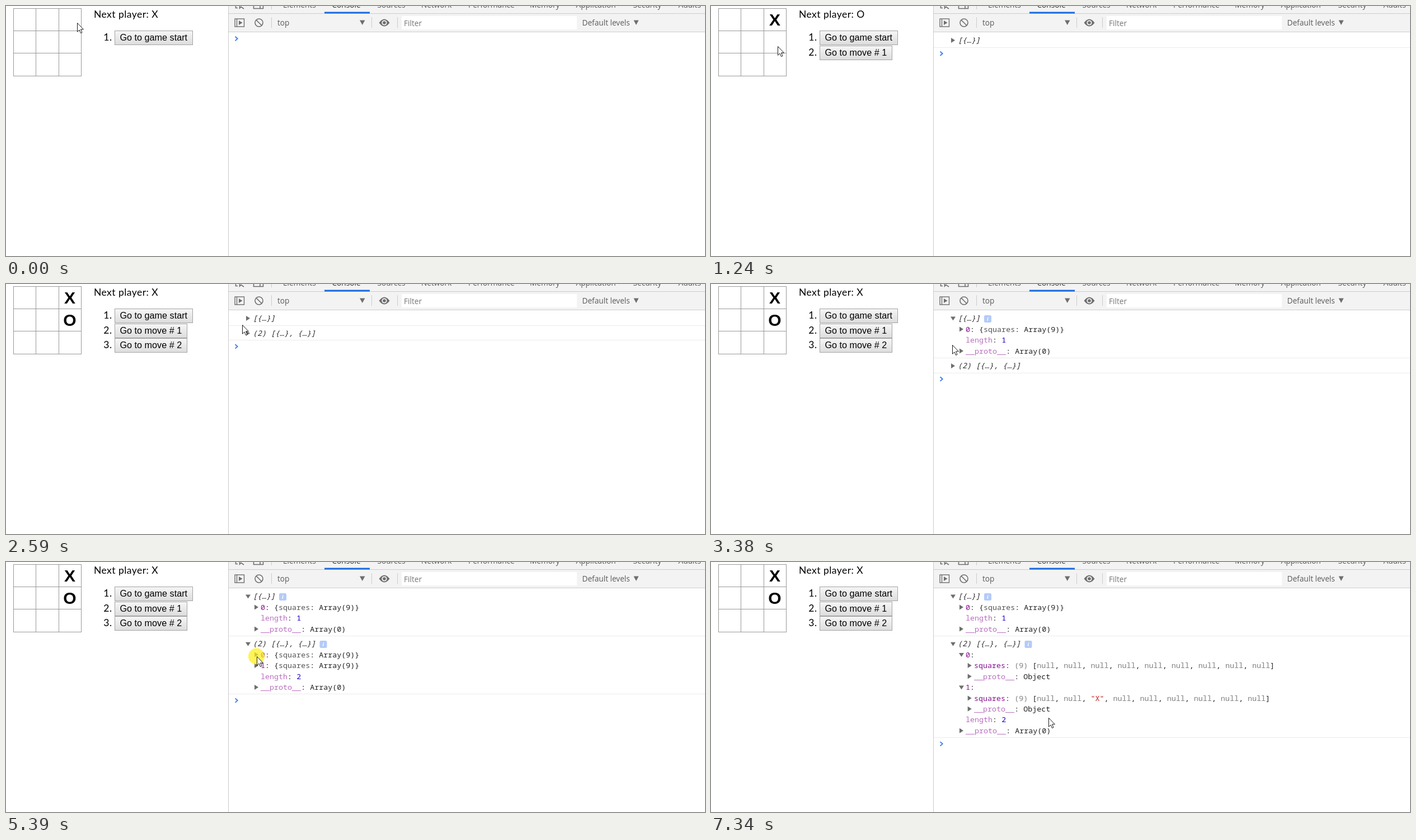
An HTML page for the animation above (7430 ms loop, 1249 px wide and 448 px high).

```html
<!DOCTYPE html>
<html lang="en">
<head>
<meta charset="utf-8">
<title>Game history in the console</title>
<style>
  html, body { margin: 0; width: 100%; height: 100%; overflow: hidden; background: #fff; }
  svg { display: block; width: 1249px; height: 448px; }
  text { white-space: pre; }
  .page { font: 17.5px Lato, sans-serif; letter-spacing: .45px; fill: #000; }
  .btn { font: 16.2px "Liberation Sans", Arial, sans-serif; fill: #000; }
  .mark { font: bold 30px "Liberation Sans", Arial, sans-serif; text-anchor: middle; }
  .ui { font: 13.65px "Open Sans", "Noto Sans", sans-serif; fill: #5a5a5a; }
  .mono { font: 13.36px "Noto Sans Mono", monospace; fill: #222; }
  .head { font-style: italic; fill: #303030; }
  .key { fill: #881391; }
  .dim { fill: #b96fc0; }
  .num { fill: #1c00cf; }
  .str { fill: #c41a16; }
  .gray { fill: #808080; }
  .name { fill: #565656; }
  .info { font: italic bold 10px "Liberation Serif", serif; fill: #fff; text-anchor: middle; }
  .tri { fill: #6e6e6e; }
  .icon { fill: none; stroke: #6e6e6e; stroke-width: 1.6; }
</style>
</head>
<body>
<svg viewBox="0 0 1249 448">
  <defs>
    <linearGradient id="face" x1="0" y1="0" x2="0" y2="1">
      <stop offset="0" stop-color="#f6f6f6"/><stop offset="1" stop-color="#dddddd"/>
    </linearGradient>
  </defs>

  <path d="M13.5 4V126M53.5 4V126M94.5 4V126M134.5 4V126M13 4.5H135M13 44.5H135M13 84.5H135M13 125.5H135"
        fill="none" stroke="#999"/>
  <g id="game"></g>

  <rect x="397" width="852" height="46" fill="#f3f3f3"/>
  <path d="M397.5 0V448M397 13.5H1249M397 46.5H1249" stroke="#ccc"/>
  <rect x="569" y="10.5" width="81" height="3" fill="#1a6be0"/>
  <g id="tabs" class="ui"></g>
  <path d="M474.5 0V6M474.5 20V39M653.5 20V39M699.5 20V39" stroke="#ccc"/>
  <g class="icon">
    <path d="M410.5 0V3.5H414M417.5 -4V4L420 1.5L425 5M442.5 0V4.5H459.5V0M454 0V4"/>
    <rect x="409" y="23" width="16.5" height="14" stroke-width="1.4"/>
    <path d="M412.5 23V37" stroke-width="1.4"/>
    <circle cx="452" cy="30" r="7"/><path d="M447 25L457 35"/>
  </g>
  <path class="tri" d="M416 26L422.5 30L416 34ZM632 25.5H641.5L636.7 34ZM1121.5 25.5H1130.5L1126 34Z"/>
  <path class="tri" d="M666.5 30Q676 17 685.5 30Q676 43 666.5 30Z"/>
  <circle cx="676" cy="30" r="4.6" fill="#f3f3f3"/><circle cx="676" cy="30" r="2.8" class="tri"/>
  <rect x="707" y="18" width="313" height="24" fill="#fff"/>
  <g class="ui">
    <text x="485" y="35">top</text>
    <text x="711" y="36" fill="#757575">Filter</text>
    <text x="1029.5" y="35">Default levels</text>
  </g>

  <g id="log"></g>
  <g id="pointer">
    <circle id="press" cx="-.5" cy="0" r="14.6" fill="#ffee14" fill-opacity=".7"/>
    <path d="M.5 .5V16.3L4 12.9L6.5 18.6L9 17.5L6.5 11.9H11.4Z" fill="#fff" stroke="#1a1a1a"/>
  </g>
</svg>

<script>
const LOOP = 7430;
const $ = id => document.getElementById(id);

const tabs = { Elements: 495, Console: 582.5, Sources: 663.5, Network: 742, Performance: 826,
  Memory: 936, Application: 1018.5, Security: 1120.5, Audits: 1201.5 };
$('tabs').innerHTML = Object.entries(tabs).map(([name, x]) =>
  `<text x="${x}" y="2.5"${name === 'Console' ? ' fill="#333"' : ''}>${name}</text>`).join('');

// Times at which each click takes effect, and when the button is held down
const stages = [250, 1710, 3140, 4160, 5540, 6650];
const presses = [[100, 250], [1560, 1710], [2990, 3140], [4080, 4160], [5310, 5540], [6480, 6650]];

// Pointer moves: start, end, steps, goal, optional bend point
const moves = [
  [870, 1240, 6, [119, 72], [127, 55]],
  [1560, 1560, 1, [119, 71]],
  [1880, 2590, 10, [422, 73], [270, 97]],
  [2670, 2830, 3, [429, 62]],
  [3140, 3700, 8, [433, 156]],
  [4080, 4080, 1, [432, 149]],
  [4410, 4410, 1, [428, 133]],
  [4485, 5080, 9, [448, 172], [440, 72]],
  [5160, 5160, 1, [448, 173]],
  [5310, 5310, 1, [448, 169]],
  [5620, 6010, 6, [448, 233]],
  [6180, 6180, 1, [447, 230]],
  [6260, 6260, 1, [446, 227]],
  [6330, 6330, 1, [446, 225]],
  [6730, 6730, 1, [446, 228]],
  [7290, 7290, 1, [520, 262]],
  [7340, 7340, 1, [603, 279]]
];

function pointerAt(t) {
  let pos = [127, 30];
  for (const [start, end, steps, goal, bend] of moves) {
    if (t < start) break;
    const gap = steps > 1 ? (end - start) / (steps - 1) : 1;
    const f = Math.min(steps, Math.floor((t - start) / gap + 1.001)) / steps;
    const u = f * f * (3 - 2 * f);
    const from = pos;
    pos = goal.map((g, i) => {
      const mid = bend ? bend[i] : (from[i] + g) / 2;
      return (1 - u) ** 2 * from[i] + 2 * u * (1 - u) * mid + u * u * g;
    });
  }
  return pos.map(Math.round);
}

function drawGame(stage) {
  let out = `<text class="page" x="157" y="21">Next player: ${stage === 1 ? 'O' : 'X'}</text>`;
  const labels = ['Go to game start', 'Go to move # 1', 'Go to move # 2'];
  labels.slice(0, Math.min(stage, 2) + 1).forEach((label, i) => {
    const y = [44, 71, 97][i];
    out += `<text class="page" x="189.5" y="${y + 18}" text-anchor="end">${i + 1}.</text>
      <rect x="194.5" y="${y + .5}" width="${i ? 129 : 139}" height="25" fill="url(#face)" stroke="#a3a3a3"/>
      <text class="btn" x="203.5" y="${y + 18}">${label}</text>`;
  });
  if (stage > 0) out += '<text class="mark" x="114" y="35">X</text>';
  if (stage > 1) out += '<text class="mark" x="114" y="75">O</text>';
  return out;
}

// A row is [level, arrow, ...[class, text]]; arrow: 0 none, 1 closed, 2 open
const size = n => [1, 0, ['dim', 'length'], ['', ': '], ['num', n]];
const proto = (level, type) => [level, 1, ['dim', '__proto__'], ['', ': ' + type]];

function item(index, open, filled) {
  if (!open) return [[1, 1, ['key', index], ['', ': {'], ['name', 'squares'], ['', ': Array(9)}']]];
  const cells = Array(9).fill('null');
  if (filled) cells[2] = '"X"';
  const list = cells.flatMap((v, i) => [[v === 'null' ? 'gray' : 'str', v], ['', i < 8 ? ', ' : ']']]);
  return [
    [1, 2, ['key', index], ['', ':']],
    [2, 1, ['key', 'squares'], ['', ': '], ['gray', '(9) '], ['', '['], ...list],
    proto(2, 'Object')
  ];
}

function drawRow([level, arrow, ...parts], y) {
  const x = [441, 455, 470][level];
  const ax = [429, 444, 458.7][level];
  const tri = ['', `M${ax} ${y - 4.5}L${ax + 7} ${y}L${ax} ${y + 4.5}Z`,
    `M${ax - 1} ${y - 3}H${ax + 8}L${ax + 3.5} ${y + 4}Z`][arrow];
  const spans = parts.map(([cls, s]) => `<tspan class="${cls}">${s}</tspan>`).join('');
  return `<path class="tri" d="${tri}"/>
    <text class="mono${level ? '' : ' head'}" x="${x}" y="${Math.round(y + 4.6)}">${spans}</text>`;
}

function drawLog(stage) {
  const groups = [];
  if (stage > 0) groups.push(['[{…}]', stage > 2, 488,
    [...item(0), size(1), proto(1, 'Array(0)')]]);
  if (stage > 1) groups.push(['(2) [{…}, {…}]', stage > 3, 560.5,
    [...item(0, stage > 4), ...item(1, stage > 5, true), size(2), proto(1, 'Array(0)')]]);
  let top = 47.3, out = '';
  for (const [title, open, badge, rows] of groups) {
    const y = top + 14.3;
    out += drawRow([0, open ? 2 : 1, ['', title]], y);
    if (open) {
      out += `<rect x="${badge}" y="${Math.round(y - 6)}" width="13" height="13" rx="2.5" fill="#b3cbf8"/>
        <text class="info" x="${badge + 6.3}" y="${Math.round(y + 4)}">i</text>`;
      rows.forEach((row, i) => out += drawRow(row, y + 19.45 * (i + 1)));
      top += 19.45 * rows.length;
    }
    top += 26.7;
    out += `<path d="M398 ${Math.floor(top) + .5}H1249" stroke="#ececec"/>`;
  }
  return out + `<path d="M409.5 ${top + 7.5}L413.7 ${top + 11.2}L409.5 ${top + 15}"
    fill="none" stroke="#367cf1" stroke-width="1.8"/>`;
}

let shown = -1;
const began = performance.now();

function frame() {
  const t = (performance.now() - began) % LOOP;
  const stage = stages.filter(s => t >= s).length;
  if (stage !== shown) {
    $('game').innerHTML = drawGame(stage);
    $('log').innerHTML = drawLog(stage);
    shown = stage;
  }
  $('pointer').setAttribute('transform', `translate(${pointerAt(t)})`);
  $('press').style.display = presses.some(([a, b]) => t >= a && t < b) ? '' : 'none';
  requestAnimationFrame(frame);
}
frame();
</script>
</body>
</html>
```
